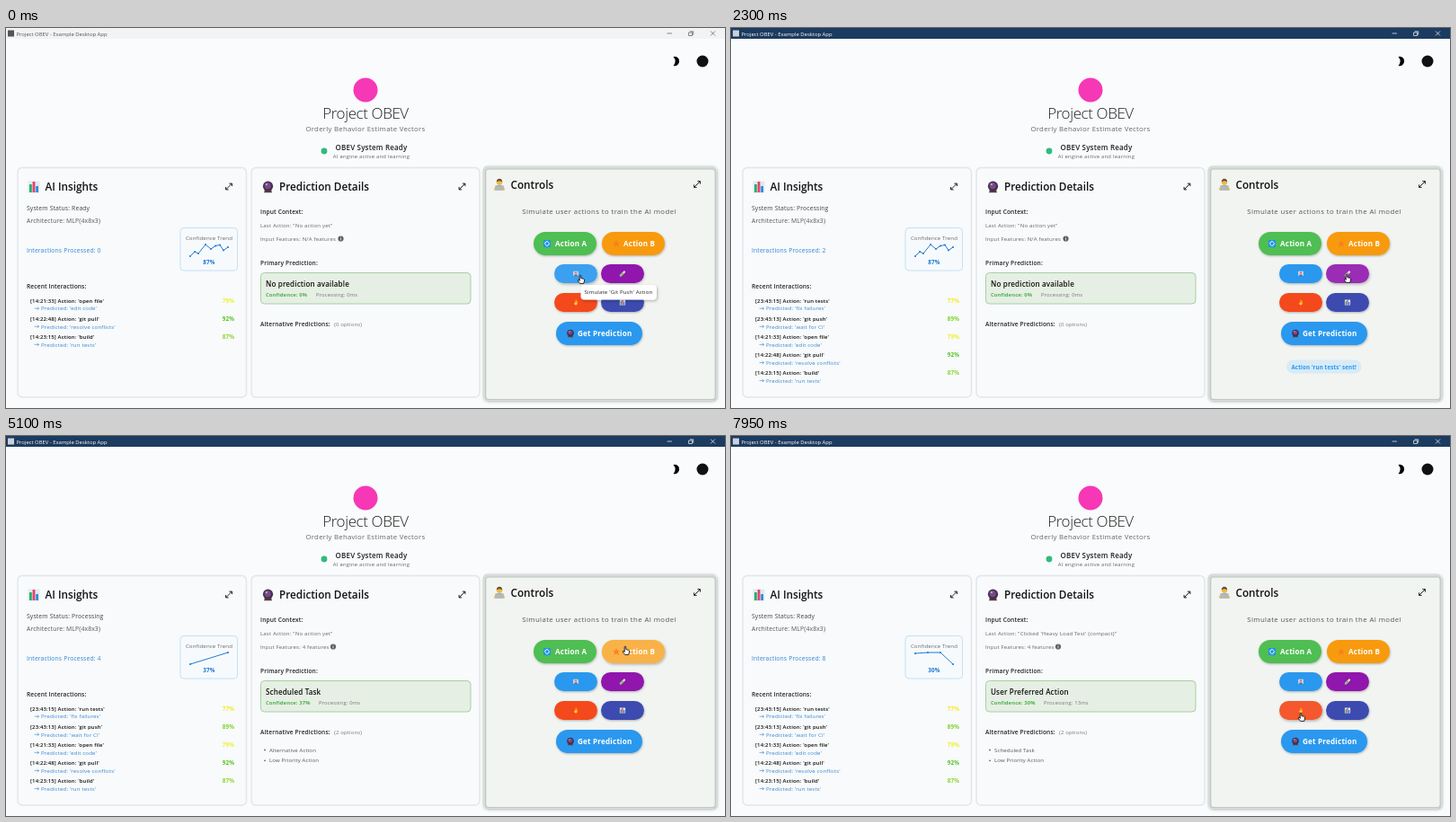
An HTML page for the animation above (8 s loop, 800x423 px).

```html
<!DOCTYPE html>
<html lang="en">
<head>
<meta charset="utf-8">
<title>Example Desktop App</title>
<style>
  html, body { margin: 0; width: 100%; height: 100%; overflow: hidden; background: #fafbfc; }
  svg { display: block; width: 100vw; height: 100vh; font-family: "Open Sans", "Noto Sans", sans-serif; }
  text { white-space: pre; }
</style>
</head>
<body>
<svg id="stage" viewBox="0 0 800 423"></svg>
<script>
const LOOP = 8000;
const stage = document.getElementById('stage');

// Drawing helpers
const text = (x, y, s, size, fill = '#222', { w = 400, ls = 0.14, at = 'start' } = {}) =>
  `<text x="${x}" y="${y}" font-size="${size}" fill="${fill}" font-weight="${w}" letter-spacing="${ls}" text-anchor="${at}">${s}</text>`;
const rect = (x, y, w, h, r, fill, extra = '') =>
  `<rect x="${x}" y="${y}" width="${w}" height="${h}" rx="${r}" fill="${fill}" ${extra}/>`;
const circle = (x, y, r, fill) => `<circle cx="${x}" cy="${y}" r="${r}" fill="${fill}"/>`;
const path = (d, fill, stroke = 'none', width = 1) =>
  `<path d="${d}" fill="${fill}" stroke="${stroke}" stroke-width="${width}" stroke-linecap="round" stroke-linejoin="round"/>`;
const place = (x, y, body, scale = 1) => `<g transform="translate(${x} ${y}) scale(${scale})">${body}</g>`;

// Small pictures, centred on 0,0
const chartIcon = rect(-6.5, -6.5, 13, 13, 1, '#dfeaf0') + rect(-5, -3, 2.8, 9, 0, '#27b06c') +
  rect(-1.4, -6, 2.8, 12, 0, '#e8406a') + rect(2.2, -1, 2.8, 7, 0, '#2c8fe0');
const crystalIcon = path('M-4.5 6.3L-3.4 3H3.4L4.5 6.3Z', '#5b4038') + circle(0, -0.8, 5.6, '#43304f') +
  circle(-0.3, -1.3, 3.6, '#774a86') + circle(-1.6, -2.8, 1.1, '#c9a4dc');
const workerIcon = path('M-5.5 6Q-5 0 0 0T5.5 6Z', '#8b979c') + circle(0, -3, 3.2, '#eebc45') +
  path('M-3.2 -3Q-3 -6.8 0 -6.8T3.2 -3Q0 -5.5 -3.2 -3Z', '#6a4a35') + rect(-4.8, 0.8, 9.6, 5.2, 0.8, '#b3b9bb') +
  circle(-4.8, 4.6, 1.2, '#eebc45') + circle(4.8, 4.6, 1.2, '#eebc45');
const syncIcon = rect(-4, -4, 8, 8, 1.2, '#1f93e6') +
  path('M-2.3 0.4A2.3 2.3 0 0 1 1.6 -1.7M2.3 -0.4A2.3 2.3 0 0 1 -1.6 1.7', 'none', '#fff', 1);
const sparkIcon = path('M0 -4L1 -1 4 -1.5 1.7 0.6 3 4 0 2 -3 4 -1.7 0.6 -4 -1.5 -1 -1Z', '#fb7d22');
const pushIcon = rect(-2.8, -2.8, 5.6, 5.2, 0.7, '#d7e4f1') + rect(-1.4, -2, 2.8, 2, 0, '#e06a78') + rect(-1.7, 1, 3.4, 1.6, 0, '#47698f');
const tubeIcon = path('M-2 2L2 -2', 'none', '#dbe8d3', 2.4) + path('M-1.9 1.9L0.4 -0.4', 'none', '#74c34c', 1.6);
const fireIcon = path('M0 -3.4Q2.6 -0.8 2 1.4Q1 3.3 0 3.2Q-2.4 3 -2 0.6L-1 -0.6Z', '#ff9b1c') + circle(0, 1.6, 1, '#ffdc5a');
const expandIcon = path('M-3 3L3 -3M0.8 -3.4H3.4V-0.8M-0.8 3.4H-3.4V0.8', 'none', '#111', 0.95);
const handIcon = path('M-1.8 0.8V-4.4Q-1 -5.6 -0.2 -4.4V-1.4L2.8 -0.7Q3.9 -0.3 3.6 1L2.8 4.4H-1.4L-4 1Q-3.6 -0.2 -1.8 0.8Z', '#fff', '#111', 0.9);

const buttons = [
  { x: 587, y: 227, w: 70, h: 26, fill: '#4fbe52', icon: syncIcon, ix: 15, label: 'Action A' },
  { x: 663, y: 227, w: 70, h: 26, fill: '#f79a0c', icon: sparkIcon, ix: 16, label: 'Action B' },
  { x: 610, y: 263, w: 48, h: 21, fill: '#2b98ee', icon: pushIcon, ix: 24 },
  { x: 662, y: 263, w: 48, h: 21, fill: '#9015ad', icon: tubeIcon, ix: 24 },
  { x: 610, y: 295, w: 48, h: 21, fill: '#f4481f', icon: fireIcon, ix: 24 },
  { x: 662, y: 295, w: 48, h: 21, fill: '#3c4bb0', icon: place(0, 0, chartIcon, 0.48), ix: 24 },
  { x: 612, y: 327, w: 96, h: 26, fill: '#2b98ee', icon: place(0, 0, crystalIcon, 0.68), ix: 16, label: 'Get Prediction' },
];

// Timeline
const clicks = [250, 2050, 3250, 4950, 6200, 7150];
const busy = [[300, 1500], [2100, 2950], [3450, 4350], [4950, 5800], [6350, 6950], [7200, 7800]];
const toasts = [[300, 1850, 'git push'], [2100, 3150, 'run tests']];
const cursorStops = [
  [0, 640, 280], [1200, 640, 280], [1700, 686, 279], [2500, 686, 279], [3050, 629, 244], [3850, 629, 244],
  [4600, 690, 239], [5300, 690, 239], [5950, 686, 307], [6550, 686, 307], [7000, 635, 313], [LOOP, 635, 313],
];
const history = [
  [2100, "[23:43:15] Action: 'run tests'", "'fix failures'", '77%', '#f3ea22'],
  [300, "[23:43:13] Action: 'git push'", "'wait for CI'", '89%', '#7fd02c'],
  [0, "[14:21:33] Action: 'open file'", "'edit code'", '79%', '#eef02c'],
  [0, "[14:22:48] Action: 'git pull'", "'resolve conflicts'", '92%', '#55c322'],
  [0, "[14:23:15] Action: 'build'", "'run tests'", '87%', '#8ad62e'],
];
const idle = { title: 'No prediction available', conf: 0, ms: 0, trend: 87, features: 'N/A', last: 'No action yet', alts: [],
  points: [[205, 254], [210, 249], [214, 251], [222, 241], [228, 246], [233, 242.5], [238, 241.5], [242, 247.5], [247, 244]] };
const scheduled = { title: 'Scheduled Task', conf: 37, ms: 0, trend: 37, features: '4', last: 'No action yet',
  alts: ['Alternative Action', 'Low Priority Action'], points: [[205, 254], [247, 241]] };
const steps = [
  [0, { ...idle, count: 0 }],
  [300, { ...idle, count: 2 }],
  [3500, { ...scheduled, count: 4 }],
  [6400, { ...scheduled, count: 6, points: [[205, 254], [226, 241], [247, 241]] }],
  [7250, { ...scheduled, count: 8, title: 'User Preferred Action', conf: 30, ms: 13, trend: 30,
    last: "Clicked 'Heavy Load Test' (compact)", alts: ['Scheduled Task', 'Low Priority Action'],
    points: [[205, 242], [219, 241], [233, 241], [247, 254]] }],
];

function cursorAt(t) {
  const i = cursorStops.findIndex((s, n) => n && t <= s[0]);
  const [t0, x0, y0] = cursorStops[i - 1], [t1, x1, y1] = cursorStops[i];
  const u = (t - t0) / (t1 - t0), e = u * u * (3 - 2 * u);
  return [x0 + (x1 - x0) * e, y0 + (y1 - y0) * e];
}

function pressAt(t) {
  const age = t - (clicks.filter(c => c <= t).pop() ?? -LOOP);
  return age < 80 ? age / 80 : Math.max(0, 1 - Math.max(0, age - 110) / 150);
}

const titleBar = focused => {
  const ink = focused ? '#fff' : '#555';
  return rect(0, 0, 800, 12, 0, focused ? '#1c3b60' : '#f2f3f5') + rect(2, 2.5, 7, 7, 0, focused ? '#c9d0d8' : '#555') +
    text(11.5, 8.5, 'Project OBEV - Example Desktop App', 5.9, ink, { ls: 0 }) +
    path('M736 6H740.5M784.3 3.8L788.7 8.2M788.7 3.8L784.3 8.2M760 5H763.5V8.5H760ZM761.2 3.8H764.7V7.3', 'none', ink, 0.7);
};

const header = path('M742.5 32A5.2 5.2 0 1 1 742.5 42Q746.8 37 742.5 32Z', '#000') + circle(775, 37, 6.5, '#111') +
  circle(400, 69, 13.5, '#f638b6') +
  text(400, 101, 'Project OBEV', 17, '#222', { w: 300, ls: -0.4, at: 'middle' }) +
  text(400, 115, 'Orderly Behavior Estimate Vectors', 7.8, '#666', { ls: 0.27, at: 'middle' }) +
  circle(354, 137, 3.4, '#30bb7e') +
  text(406.5, 136, 'OBEV System Ready', 8, '#222', { w: 600, ls: 0.18, at: 'middle' }) +
  text(406.5, 145, 'AI engine active and learning', 5.9, '#666', { ls: 0.22, at: 'middle' });

const panel = (x, w) => rect(x, 155.5, w, 255.5, 5, '#f8fafb', 'stroke="#e1e6ea" stroke-width="1.4"');
const heading = (x, y, s, icon, expandX) => place(x, y, icon) +
  text(x + 12.5, y + 4.3, s, 11.75, '#111', { w: 600, ls: 0 }) + place(expandX, y - 0.5, expandIcon);
const label = (x, y, s) => text(x, y, s, 6.6, '#222', { w: 600 });

function insights(t, state) {
  const status = busy.some(([a, b]) => t >= a && t < b) ? 'Processing' : 'Ready';
  const rows = history.filter(h => t >= h[0]).map(([, action, guess, pct, color], i) => {
    const y = 306 + i * 20.1;
    return text(27, y, action, 5.95, '#111', { w: 600 }) +
      path(`M32 ${y + 6.2}H36.5M35 ${y + 4.9}L36.5 ${y + 6.2}L35 ${y + 7.5}`, 'none', '#3a86d2', 0.6) +
      text(39, y + 8.4, 'Predicted: ' + guess, 6.15, '#3a86d2') +
      text(254, y, pct, 6.3, color, { w: 700, at: 'end' });
  }).join('');
  return panel(13, 254.5) + heading(31, 177, 'AI Insights', chartIcon, 248) +
    text(23, 203, 'System Status: ' + status, 6.8, '#444') +
    text(23, 216.5, 'Architecture: MLP(4x8x3)', 6.8, '#555') +
    text(23, 249.5, 'Interactions Processed: ' + state.count, 6.8, '#2f86d6') +
    rect(194, 222.5, 63.5, 47.5, 4, '#f7fafd', 'stroke="#c3e0f6"') +
    text(226, 235.5, 'Confidence Trend', 6.1, '#666', { at: 'middle' }) +
    path('M' + state.points.join('L'), 'none', '#1f7bd0', 1) +
    state.points.map(([x, y]) => circle(x, y, 1, '#1f7bd0')).join('') +
    text(226, 262.8, state.trend + '%', 6.3, '#1976d2', { w: 700, at: 'middle' }) +
    label(23, 289.5, 'Recent Interactions:') + rows;
}

function details(state) {
  const infoX = state.features === '4' ? 364 : 372.5;
  return panel(273, 254) + heading(291.5, 177, 'Prediction Details', crystalIcon, 507.5) +
    label(283, 207, 'Input Context:') +
    text(283, 222, `Last Action: "${state.last}"`, 6.1, '#666') +
    text(283, 236.7, `Input Features: ${state.features} features`, 6.1, '#666') +
    circle(infoX, 234.5, 3.1, '#5c6166') + path(`M${infoX} 234.4V236M${infoX} 233V233.1`, 'none', '#fff', 0.7) +
    label(283, 263.5, 'Primary Prediction:') +
    rect(283.5, 272.5, 233.5, 34.5, 4, '#e6efe3', 'stroke="#a6d0a5"') +
    text(289, 287.7, state.title, 8.05, '#111', { w: 600 }) +
    text(289, 299.2, `Confidence: ${state.conf}%`, 5.8, '#4caf50', { w: 700 }) +
    text(state.conf ? 348 : 345, 299.2, `Processing: ${state.ms}ms`, 5.9, '#777') +
    label(283, 332, 'Alternative Predictions:') +
    text(365, 332, `(${state.alts.length} options)`, 6, '#777') +
    state.alts.map((s, i) => circle(288, 349.5 + i * 11.8, 0.9, '#666') + text(293, 351.5 + i * 11.8, s, 6, '#555')).join('');
}

function button(b, cursor, press) {
  const { x, y, w, h } = b;
  const over = cursor[0] >= x && cursor[0] <= x + w && cursor[1] >= y && cursor[1] <= y + h;
  const glow = over ? 0.08 + 0.22 * press : 0;
  return `<g filter="url(#${over ? 'raised' : 'soft'})">${rect(x, y, w, h, h / 2, b.fill)}</g>` +
    rect(x, y, w, h, h / 2, '#fff', `opacity="${glow.toFixed(3)}"`) + place(x + b.ix, y + h / 2, b.icon) +
    (b.label ? text(x + 24, y + 16.2, b.label, 8.1, '#fff', { w: 700, ls: 0.2 }) : '');
}

function controls(t) {
  const cursor = cursorAt(t), press = pressAt(t);
  const toast = toasts.find(([a, b]) => t >= a && t < b);
  return `<g filter="url(#raised)">${rect(530.5, 153.5, 260, 261, 5, '#d6dcd7')}</g>` +
    rect(533.7, 157, 255.5, 256.5, 3, '#f1f4f1', 'stroke="#bcc8be" stroke-width="1.2"') +
    heading(549, 174.5, 'Controls', workerIcon, 769) +
    text(660, 207, 'Simulate user actions to train the AI model', 7.8, '#555', { ls: 0.4, at: 'middle' }) +
    buttons.map(b => button(b, cursor, press)).join('') +
    (toast ? rect(618, 369.5, 83.5, 15, 7.5, '#d8ebf6') +
      text(659.7, 379.7, `Action '${toast[2]}' sent!`, 6.1, '#2196f3', { w: 700, ls: 0.18, at: 'middle' }) : '') +
    (t < 250 ? `<g filter="url(#raised)">${rect(639.5, 286, 84.5, 16.5, 4, '#fff')}</g>` +
      text(643.5, 296.4, "Simulate 'Git Push' Action", 6.1, '#222') : '') +
    place(...cursor.map(v => v.toFixed(2)), handIcon);
}

const shadow = (id, dx, dy, blur, alpha) =>
  `<filter id="${id}" x="-20%" y="-30%" width="150%" height="180%"><feDropShadow dx="${dx}" dy="${dy}" stdDeviation="${blur}" flood-opacity="${alpha}"/></filter>`;
const defs = `<defs>${shadow('soft', 0.5, 1, 1, 0.28)}${shadow('raised', 1, 1.4, 1.8, 0.28)}</defs>`;

const start = performance.now();
let shown = '';

function render() {
  const t = (performance.now() - start) % LOOP;
  const state = steps.filter(s => s[0] <= t).pop()[1];
  const scene = defs + rect(0, 0, 800, 423, 0, '#fafbfc') + titleBar(t >= 250) + header +
    insights(t, state) + details(state) + controls(t);
  if (scene !== shown) stage.innerHTML = shown = scene;
  requestAnimationFrame(render);
}
render();
</script>
</body>
</html>
```
